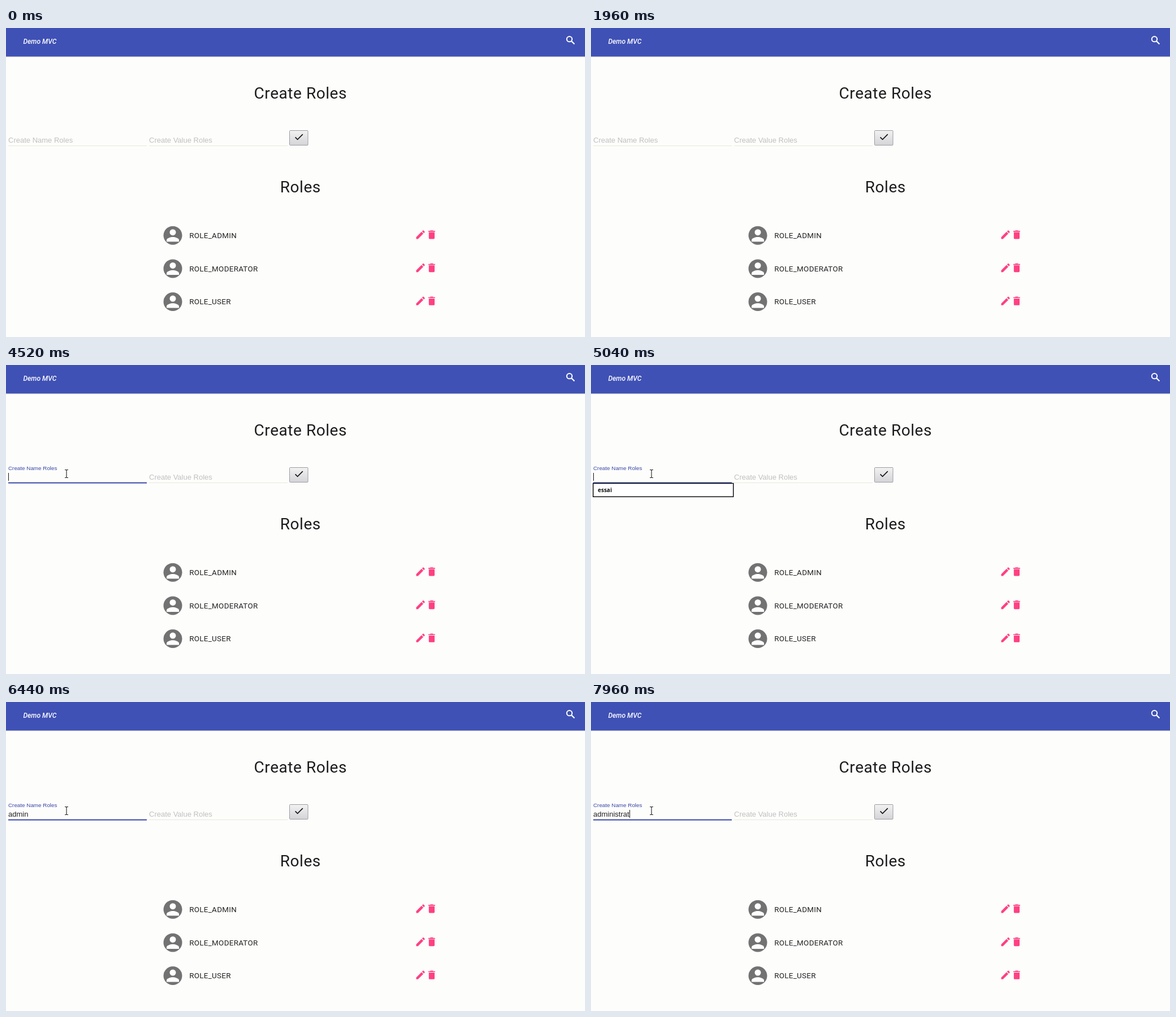
Recreate the animation shown at these times as an HTML page. Size 1024 px wide and 547 px high, loop 8 s.

```html
<!DOCTYPE html>
<html lang="en">
<head>
<meta charset="utf-8">
<title>Roles</title>
<style>
  html, body { margin: 0; width: 100%; height: 100%; overflow: hidden; background: #fdfdfc; }
  svg { display: block; width: 1024px; height: 547px; }
  text { white-space: pre; }
  .head { font: 28px Roboto, sans-serif; letter-spacing: .55px; fill: #1c1c1c; }
  .role { font: 13.4px Roboto, sans-serif; letter-spacing: .3px; fill: #222; }
  .field { font-family: "Liberation Sans", Arial, sans-serif; font-size: 13px; }
  .hint { fill: #c0c0c0; }
</style>
</head>
<body>
<svg viewBox="0 0 1024 547">
  <defs>
    <linearGradient id="face" x2="0" y2="1">
      <stop stop-color="#f2f2f2"/><stop offset="1" stop-color="#d4d4d8"/>
    </linearGradient>
    <linearGradient id="shade" x2="0" y2="1">
      <stop stop-color="#000" stop-opacity=".16"/><stop offset="1" stop-color="#000" stop-opacity="0"/>
    </linearGradient>
    <g id="person">
      <circle cx="12" cy="12" r="12" fill="#727272"/>
      <circle cx="12" cy="8" r="4" fill="#fff"/>
      <path d="M12 14c-2.67 0-8 1.34-8 4v2h16v-2c0-2.66-5.33-4-8-4z" fill="#fff"/>
    </g>
    <path id="pencil" d="M3 17.25V21h3.75L17.81 9.94l-3.75-3.75zM20.71 7.04c.39-.39.39-1.02 0-1.41l-2.34-2.34c-.39-.39-1.02-.39-1.41 0l-1.83 1.83 3.75 3.75z"/>
    <path id="bin" d="M6 19c0 1.1.9 2 2 2h8c1.1 0 2-.9 2-2V7H6zM19 4h-3.5l-1-1h-5l-1 1H5v2h14z"/>
  </defs>

  <rect width="1024" height="50.5" fill="#3f51b5"/>
  <rect y="50.5" width="1024" height="2" fill="url(#shade)"/>
  <text x="30.5" y="27.5" font-family="Roboto, sans-serif" font-size="12" font-style="italic" font-weight="500" fill="#fff">Demo MVC</text>
  <g transform="translate(988.2 11.4) scale(.87)" fill="none" stroke="#fff" stroke-width="2.3">
    <circle cx="9.5" cy="9.5" r="5.4"/><path d="M13.6 13.6l6.1 6.1" stroke-width="2.5"/>
  </g>

  <text class="head" x="520.8" y="125" text-anchor="middle">Create Roles</text>
  <text class="head" x="520.8" y="291" text-anchor="middle">Roles</text>

  <path d="M4 208.5H249M253 208.5H498" stroke="#e8e8da"/>
  <text class="field hint" x="253" y="203">Create Value Roles</text>
  <text class="field" id="label" x="4">Create Name Roles</text>
  <text class="field" id="typed" x="4" y="202.5" fill="#222"></text>
  <rect id="line" y="207.6" height="2" fill="#3a48a8"/>
  <rect id="caret" y="191" width="1" height="14" fill="#111"/>

  <rect x="501.5" y="181.5" width="32.5" height="26" rx="1" fill="url(#face)" stroke="#9c9ca2"/>
  <path transform="translate(508.2 182.9) scale(.82)" d="M9 16.17L4.83 12l-1.42 1.41L9 19 21 7l-1.41-1.41z" fill="#111"/>

  <g id="list"></g>

  <g id="menu">
    <rect x="3.7" y="209.5" width="248" height="23.7" fill="#fff" stroke="#000" stroke-width="1.4"/>
    <text x="12" y="225" font-family="Open Sans, sans-serif" font-size="10" font-weight="700" fill="#111">essai</text>
  </g>
  <g id="pointer">
    <path id="beam" d="M-3 -6.5H-1L0 -5.5L1 -6.5H3M0 -6V7M-3 7.5H-1L0 6.5L1 7.5H3" fill="none" stroke="#222" stroke-width="1.1"/>
    <path id="arrow" d="M0 0V16L3.7 12.6L6.2 18.4L8.5 17.4L6 11.8H11Z" fill="#fff" stroke="#000"/>
  </g>
</svg>
<script>
const $ = id => document.getElementById(id);
const LOOP = 8000, ENTER = 2600, REST = 3400, CLICK = 4000, MENU = 4760;
const WORD = 'administrat';
const KEYS = [5200, 5320, 5440, 5520, 5640, 6760, 7000, 7280, 7480, 7680, 7880];

$('list').innerHTML = ['ROLE_ADMIN', 'ROLE_MODERATOR', 'ROLE_USER'].map((name, i) => `
  <g transform="translate(0 ${367.2 + i * 58.7})">
    <use href="#person" transform="translate(278.5 -16.5) scale(1.375)"/>
    <text class="role" x="324.3" y="4.8">${name}</text>
    <g fill="#ff4081">
      <use href="#pencil" transform="translate(722.9 -11.6) scale(.85)"/>
      <use href="#bin" transform="translate(742.7 -11.6) scale(.85)"/>
    </g>
  </g>`).join('');

const clamp = v => Math.max(0, Math.min(1, v));
const ease = v => v * v * (3 - 2 * v);
const mix = (a, b, k) => a + (b - a) * k;
const show = (id, on) => $(id).setAttribute('visibility', on ? 'visible' : 'hidden');
const set = (id, attrs) => Object.entries(attrs).forEach(([k, v]) => $(id).setAttribute(k, v));

function draw(t) {
  const focus = ease(clamp((t - CLICK) / 200));
  set('label', {
    y: mix(203, 186, focus),
    style: `font-size:${mix(13, 9.85, focus)}px`,
    fill: focus ? '#3a48a8' : '#c0c0c0'
  });
  set('line', { x: mix(126.5, 4, focus), width: 245 * focus });

  const typed = KEYS.filter(k => k <= t).length;
  $('typed').textContent = WORD.slice(0, typed);
  const width = typed ? $('typed').getComputedTextLength() : 0;
  set('caret', { x: Math.round(4 + width) });
  const last = Math.max(...[CLICK, MENU, ...KEYS].filter(k => k <= t));
  show('caret', t >= CLICK && (t - last) % 1060 < 530);
  show('menu', t >= MENU && t < KEYS[0]);

  const k = ease(clamp((t - ENTER) / (REST - ENTER)));
  const x = mix(290, 107, k), y = mix(547, 192, k);
  const overField = x < 250 && y < 210;
  set('pointer', { transform: `translate(${x} ${y})` });
  show('beam', t >= ENTER && overField);
  show('arrow', t >= ENTER && !overField);
}

const start = performance.now();
(function tick() {
  draw((performance.now() - start) % LOOP);
  requestAnimationFrame(tick);
})();
</script>
</body>
</html>
```
